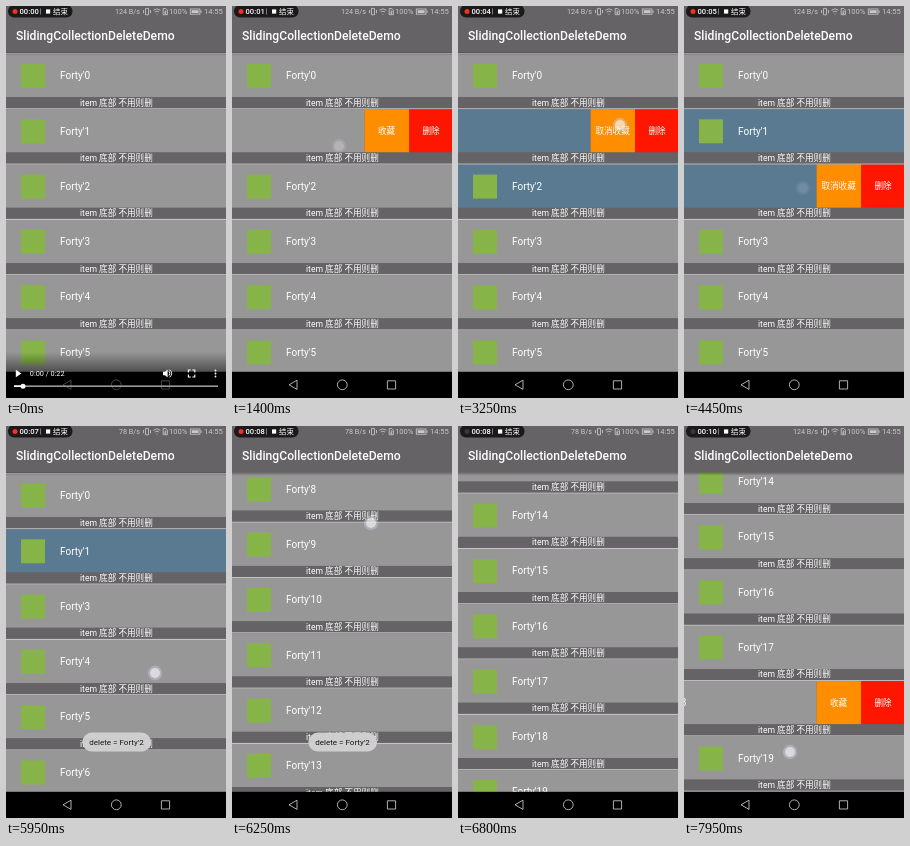
These frames come from a looping animation (220x392 px, 8000 ms). An HTML page:

```html
<!DOCTYPE html>
<html lang="zh">
<head>
<meta charset="utf-8">
<title>Sliding list</title>
<style>
html, body { margin: 0; width: 100%; height: 100%; overflow: hidden; background: #000; }
svg { display: block; width: 100%; height: 100%; }
text { font-family: Roboto, "Noto Sans CJK SC", "Noto Sans CJK", sans-serif; fill: #fff; }
.mid { text-anchor: middle; }
.end { text-anchor: end; }
.line { fill: none; stroke: #c4c2c4; stroke-width: .9; }
.status text { font-size: 7.6px; fill: #c9c7c9; }
.status .pill text { fill: #fff; }
</style>
</head>
<body>
<svg viewBox="0 0 220 392" preserveAspectRatio="none">
  <defs>
    <linearGradient id="shade" x1="0" y1="0" x2="0" y2="1">
      <stop offset="0" stop-opacity="0"/>
      <stop offset=".45" stop-opacity=".5"/>
      <stop offset="1" stop-opacity=".75"/>
    </linearGradient>
    <linearGradient id="shadow" x1="0" y1="0" x2="0" y2="1">
      <stop offset="0" stop-opacity=".3"/>
      <stop offset="1" stop-opacity="0"/>
    </linearGradient>
  </defs>
  <rect width="220" height="392" fill="#656365"/>
  <g id="list"></g>

  <rect width="220" height="46.6" fill="#656365"/>
  <rect y="46.6" width="220" height="3" fill="url(#shadow)"/>
  <text x="10" y="34.4" font-size="12.16" font-weight="500">SlidingCollectionDeleteDemo</text>

  <g class="status">
    <g class="pill">
      <rect x="2" y="-1" width="64.5" height="12.4" rx="6" fill="#1b191c"/>
      <circle id="rec" cx="9" cy="5.5" r="2.5"/>
      <text id="clock" x="13.5" y="8.3" font-weight="500"></text>
      <rect x="34" y="2.5" width=".9" height="6" fill="#8a888a"/>
      <rect x="40" y="3.4" width="4.2" height="4.2" fill="#fff"/>
      <text x="47" y="8.3" style="font-size:7.4px">结束</text>
    </g>
    <text id="speed" class="end" x="134" y="8.3" style="font-size:7.2px"></text>
    <path class="line" d="M139.5 2.4h3v6.4h-3zM137.5 4v3.2M144.5 4v3.2"/>
    <path class="line" d="M147.4 4.2q3.5-2.8 7 0M148.8 6q2.1-1.7 4.2 0M150.5 8.2h.9"/>
    <path class="line" d="M157.2 2.5h2.6l1.6 1.6v4.6h-4.2zM158.6 5h1.4v1.3h-1.2v1.2h1.4"/>
    <text x="163" y="8.3">100%</text>
    <rect class="line" x="184.3" y="3" width="9.6" height="5.2"/>
    <rect x="185.6" y="4.2" width="7" height="2.8" fill="#c9c7c9"/>
    <rect x="194.5" y="4.4" width="1" height="2.4" fill="#c9c7c9"/>
    <text class="end" x="216.8" y="8.3">14:55</text>
  </g>

  <g id="toast">
    <rect x="76.4" y="306.6" width="68.6" height="19" rx="9.5" fill="#d3d2d3"/>
    <text class="mid" x="110.5" y="319" font-size="8.04" style="fill:#111">delete = Forty'2</text>
  </g>

  <rect y="365.8" width="220" height="26.2" fill="#000"/>
  <g class="line" stroke-linejoin="round">
    <path d="M65 374.2v9.2l-8-4.6z"/>
    <circle cx="110.3" cy="378.8" r="4.9"/>
    <rect x="155.4" y="374.8" width="8.2" height="8.2"/>
  </g>

  <g id="player">
    <rect y="346" width="220" height="46" fill="url(#shade)"/>
    <path d="M9.8 363.8v7.4l5.6-3.7z" fill="#fff"/>
    <text x="23.8" y="370" font-size="7.3">0:00 / 0:22</text>
    <path d="M157 365.8h2l2.6-2.4v8.2l-2.6-2.4h-2z" fill="#fff"/>
    <path d="M163 365.4q1.6 2.1 0 4.2M163.4 363.6q4.6 3.9 0 7.8" fill="none" stroke="#fff"/>
    <path d="M182.4 366.4v-2.4h2.4M186.4 364h2.4v2.4M188.8 368.6v2.4h-2.4M184.8 371h-2.4v-2.4" fill="none" stroke="#fff" stroke-width="1.1"/>
    <path d="M209.5 364.5v0M209.5 367.5v0M209.5 370.5v0" stroke="#fff" stroke-width="1.8" stroke-linecap="round"/>
    <rect x="8" y="379.4" width="204" height="1.6" fill="#999"/>
    <rect x="8" y="379.4" width="9" height="1.6" fill="#fff"/>
    <circle cx="17" cy="380.2" r="2.5" fill="#fff"/>
  </g>

  <g id="touch">
    <circle r="7.2" fill="#c8c8e0" opacity=".65"/>
    <circle r="5" fill="#fff" opacity=".8"/>
  </g>
</svg>
<script>
const LOOP = 8000, STEP = 50;
const TOP = 48, PITCH = 55.3, ROWS = 22, REMOVED = 2;
const OPEN = 87.4, SLIDE = 250;
const HOLD = 300, FADE = 250;
const SECOND = 780;

const $ = id => document.getElementById(id);
const clamp = v => Math.max(0, Math.min(1, v));
const progress = (t, start, length) => clamp((t - start) / length);
const easeOut = (p, power = 2) => 1 - (1 - p) ** power;

// When a row's buttons open and close, and when it is starred
const stories = {
  1: { starred: 1750, visits: [{ open: 950, close: 1800 }, { open: 3000, close: 3270 }] },
  2: { starred: 2750, visits: [{ open: 2200, close: 2750 }, { open: 3980, close: LOOP }] },
  18: { visits: [{ open: 7420, close: LOOP }] }
};

const tap = (at, x, y) => ({ at, x, y, dx: 0, dy: 0 });
const drag = (at, x, y, dx, dy) => ({ at, x, y, dx, dy });
const swipe = (at, x, y) => drag(at, x, y, -88, 0);

const touches = [
  swipe(950, 195, 140),
  tap(1600, 158, 127),
  swipe(2150, 195, 182),
  tap(2600, 158, 176),
  drag(3250, 162, 119, 50, 0),
  swipe(3950, 207, 182),
  tap(4800, 198, 181),
  drag(5950, 149, 247, -10, -150),
  swipe(7350, 195, 277),
  tap(7950, 106, 326)
];

const scrollAt = t => 733 * easeOut(progress(t, 5950, 1325), 3);
const collapseAt = t => easeOut(progress(t, 4950, 400));
const toastAt = t => .95 * progress(t, 5050, 200) * (1 - progress(t, 6450, 250));
const slideAt = (visits, t) => -OPEN * visits.reduce((sum, v) =>
  sum + easeOut(progress(t, v.open, SLIDE)) - easeOut(progress(t, v.close, SLIDE)), 0);

function makeRow(id) {
  const g = document.createElementNS('http://www.w3.org/2000/svg', 'g');
  g.innerHTML = `
    <rect y="-1" width="220" height="1.1" fill="#c8c7c8"/>
    <g class="slide">
      <rect class="body" width="220" height="43.2"/>
      <rect x="15" y="10" width="24" height="24" fill="#86b448"/>
      <text x="54" y="25.3" font-size="10">Forty'${id}</text>
      <rect x="220" width="44.6" height="43.2" fill="#ff8d00"/>
      <rect x="264.5" width="44" height="43.2" fill="#ff1600"/>
      <text class="label mid" x="242" y="24.8" font-size="8.6"></text>
      <text class="mid" x="286.4" y="24.8" font-size="8.6">删除</text>
    </g>
    <rect y="43.2" width="220" height="11.2" fill="#656365"/>
    <text class="mid" x="110.4" y="51.7" font-size="8.6">item 底部 不用则删</text>`;
  $('list').append(g);
  const part = name => g.querySelector('.' + name);
  return { id, g, slide: part('slide'), body: part('body'), label: part('label') };
}
const rows = Array.from({ length: ROWS }, (_, id) => makeRow(id));

function drawRow({ id, g, slide, body, label }, t) {
  const gap = collapseAt(t);
  const place = id > REMOVED ? id - gap : id;
  const y = TOP + PITCH * place - scrollAt(t);
  const hidden = y > 368 || y < -10 || (id === REMOVED && gap > 0);
  g.setAttribute('display', hidden ? 'none' : 'inline');
  if (hidden) return;

  const { visits = [], starred = LOOP } = stories[id] || {};
  g.setAttribute('transform', `translate(0 ${y})`);
  slide.setAttribute('transform', `translate(${slideAt(visits, t)} 0)`);
  body.setAttribute('fill', t < starred ? '#989798' : '#5a7a91');
  label.textContent = t < starred ? '收藏' : '取消收藏';
}

function drawTouch(t) {
  const hit = touches.find(k => t >= k.at && t < k.at + HOLD + FADE);
  $('touch').setAttribute('opacity', hit ? .75 * (1 - progress(t, hit.at + HOLD, FADE)) : 0);
  if (!hit) return;
  const p = progress(t, hit.at, HOLD);
  $('touch').setAttribute('transform', `translate(${hit.x + hit.dx * p} ${hit.y + hit.dy * p})`);
}

function draw(t) {
  rows.forEach(row => drawRow(row, t));
  drawTouch(t);
  const lit = (t + 150) % 1480 < 640;
  $('rec').setAttribute('fill', lit ? '#f4321f' : '#39363a');
  $('clock').textContent = '00:' + String(Math.floor(t / SECOND)).padStart(2, '0');
  $('speed').textContent = t >= 4850 && t < 7400 ? '78 B/s' : '124 B/s';
  $('toast').setAttribute('opacity', toastAt(t));
  $('player').setAttribute('opacity', 1 - progress(t, 400, 100));
}

const start = performance.now();
function tick() {
  const t = (performance.now() - start) % LOOP;
  draw(Math.floor(t / STEP) * STEP);
  requestAnimationFrame(tick);
}
tick();
</script>
</body>
</html>
```
